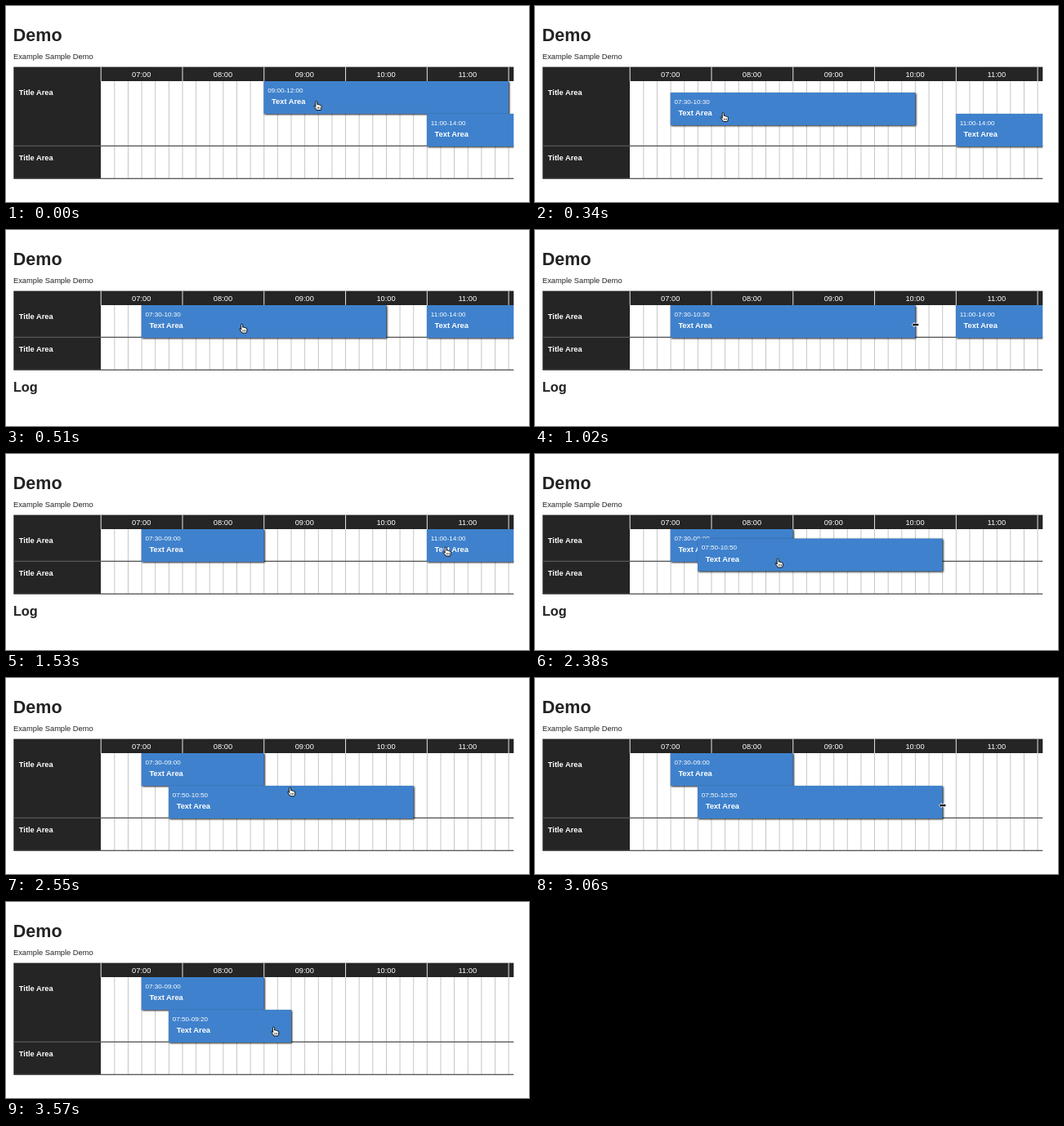
Write an HTML page that moves like this. It is 640 px wide and 240 px high and loops after 3740 ms.

```html
<!DOCTYPE html>
<html lang="en">
<head>
<meta charset="utf-8">
<title>Schedule demo</title>
<style>
  html, body { margin: 0; width: 100%; height: 100%; overflow: hidden; background: #fff; }
  svg { display: block; width: 640px; height: 240px; }
  text { font: 9.3px "Liberation Sans", Arial, sans-serif; fill: #222; }
  .bold { font-weight: bold; }
  .light { fill: #fff; }
  .hour { text-anchor: middle; }
  .time { font-size: 8.1px; }
  .dark { fill: #252525; }
  .grid { fill: #c6c6c6; }
  .rule { fill: #555; }
  .bar rect { fill: #3f81cc; filter: drop-shadow(1px 1px 1.1px rgba(0, 0, 0, .9)); }
</style>
</head>
<body>
<svg viewBox="0 0 640 240">
  <defs><clipPath id="clip"><rect x="9.3" y="70" width="612" height="160"/></clipPath></defs>
  <rect width="640" height="240" fill="#fff"/>
  <text class="bold" x="8.8" y="43" style="font-size:21.5px">Demo</text>
  <text x="9" y="65">Example Sample Demo</text>
  <g clip-path="url(#clip)">
    <rect class="dark" x="9" y="74.6" width="613" height="17.4"/>
    <rect class="dark" id="titles" x="9" y="92" width="107"/>
    <g id="lines"></g>
    <rect class="rule" id="middle" x="9" width="613" height="1.3"/>
    <rect class="rule" id="bottom" x="9" width="613" height="1.3"/>
    <g id="bars"></g>
  </g>
  <text class="bold light" x="15.8" y="108.6">Title Area</text>
  <text class="bold light" id="second" x="15.8">Title Area</text>
  <text class="bold" id="log" x="8.9" y="198" style="font-size:16.3px">Log</text>
  <g id="hand" stroke="#000" stroke-width=".9" stroke-linejoin="round">
    <path fill="#fff" d="M-2.4 2V-3.8Q-2.4-5-1.4-5T-.4-3.8V-.9Q1-1.7 1.5-.5 2.8-1.1 3.2.1 4.8-.3 4.8 1.2V3Q4.6 4.6 3.8 6H-1.2Q-2 4.4-4.2 1.8-4.9.7-4 .3-3.2 0-2.4 2Z"/>
    <path fill="none" stroke-width=".6" d="M-.3 2V4.4M1.3 2V4.4M2.9 2V4.4"/>
  </g>
  <path id="resize" fill="#111" stroke="#fff" stroke-width="1.2" paint-order="stroke"
        d="M-4 0L-2-2V-.9H2V-2L4 0 2 2V.9H-2V2Z"/>
</svg>
<script>
const STEP = 170, LOOP = 3740;
const LEFT = 115.9, TOP = 92, SLOT = 16.63; // one slot is ten minutes, starting at 07:00
const $ = id => document.getElementById(id);

function add(parent, tag, attrs, text = '') {
  const node = document.createElementNS('http://www.w3.org/2000/svg', tag);
  for (const key in attrs) node.setAttribute(key, attrs[key]);
  node.textContent = text;
  return parent.appendChild(node);
}

const slotX = slot => LEFT + slot * SLOT;
const mix = (a, b, p) => a + (b - a) * p;
const progress = (step, from, to) => Math.min(1, Math.max(0, (step - from) / (to - from)));
const easeIn = p => p * p;
const easeOut = p => 1 - (1 - p) ** 3;
const clock = slot => {
  const pad = n => String(n).padStart(2, '0');
  return pad(7 + Math.floor(slot / 6)) + ':' + pad(slot % 6 * 10);
};

const gridLines = [];
for (let n = 0; n <= 30; n++) {
  const x = slotX(n) - .2;
  if (n) gridLines.push(add($('lines'), 'rect', { class: 'grid', x, y: TOP, width: 1 }));
  if (n % 6 === 0) {
    add($('lines'), 'rect', { x, y: 74.6, width: 1, height: 17.4, fill: '#e4e4e4' });
    if (n < 30) add($('lines'), 'text', { class: 'hour light', x: x + 50, y: 86.7 }, clock(n));
  }
}

const views = [0, 1].map(() => {
  const group = add($('bars'), 'g', { class: 'bar' });
  const view = { group, box: add(group, 'rect', { height: 40 }) };
  view.time = add(group, 'text', { class: 'time light', x: 4.8, y: 13.6 });
  add(group, 'text', { class: 'bold light', x: 9.6, y: 28 }, 'Text Area');
  return view;
});

const place = (node, x, y) => node.setAttribute('transform', `translate(${x} ${y})`);
const show = (node, visible) => { node.style.display = visible ? '' : 'none'; };

const isTall = step => step < 3 || step >= 15;
const shrink = (step, from) => Math.round(mix(18, 9, easeIn(progress(step, from, from + 2))));

function barsAt(step) {
  const first = progress(step, 0, 2), second = easeOut(progress(step, 11, 14));
  return [
    { start: Math.round(mix(12, 3, first)), count: shrink(step, 6), y: step < 3 ? 14 * first : 0 },
    { start: Math.round(mix(24, 5, second)), count: shrink(step, 18), y: isTall(step) ? 40 : 11.5 * second }
  ];
}

// The pointer holds a bar, pulls its right edge, or glides between the two.
function pointerAt(step, [a, b]) {
  const hold = (bar, grab) => [slotX(bar.start) + grab, TOP + bar.y + 29.5];
  const edge = bar => [slotX(bar.start + bar.count) + .6, TOP + bar.y + 24];
  const glide = (from, to, start, end) =>
    from.map((v, i) => mix(v, to[i], progress(step, start, end)));
  if (step <= 2) return hold(a, 65.8);
  if (step < 6) return glide(hold(a, 65.8), edge(a), 2, 6);
  if (step <= 8) return edge(a);
  if (step < 11) return glide([539.5, 119], hold(b, 99.5), 9, 11);
  if (step <= 14) return hold(b, 99.5);
  if (step < 18) return glide([299, 133], edge(b), 14, 18);
  return step <= 20 ? edge(b) : [329, 158];
}
const isResizing = step => step >= 6 && step <= 8 || step >= 18 && step <= 20;

function layout(tall) {
  const split = tall ? 171 : 131, end = split + 40;
  $('titles').setAttribute('height', end - TOP);
  $('middle').setAttribute('y', split - .3);
  $('bottom').setAttribute('y', end - .3);
  $('second').setAttribute('y', split + 17.6);
  gridLines.forEach(line => line.setAttribute('height', end - TOP));
  show($('log'), !tall);
}

function draw(step) {
  layout(isTall(step));
  const bars = barsAt(step), resizing = isResizing(step);
  bars.forEach(({ start, count, y }, i) => {
    const { group, box, time } = views[i];
    place(group, slotX(start), TOP + y);
    box.setAttribute('width', count * SLOT + .3);
    time.textContent = clock(start) + '-' + clock(start + count);
  });
  show($('hand'), !resizing);
  show($('resize'), resizing);
  place($(resizing ? 'resize' : 'hand'), ...pointerAt(step, bars));
}

let shown = -1;
const began = performance.now();
function tick() {
  const step = Math.floor((performance.now() - began) % LOOP / STEP);
  if (step !== shown) draw(shown = step);
  requestAnimationFrame(tick);
}
tick();
</script>
</body>
</html>
```
